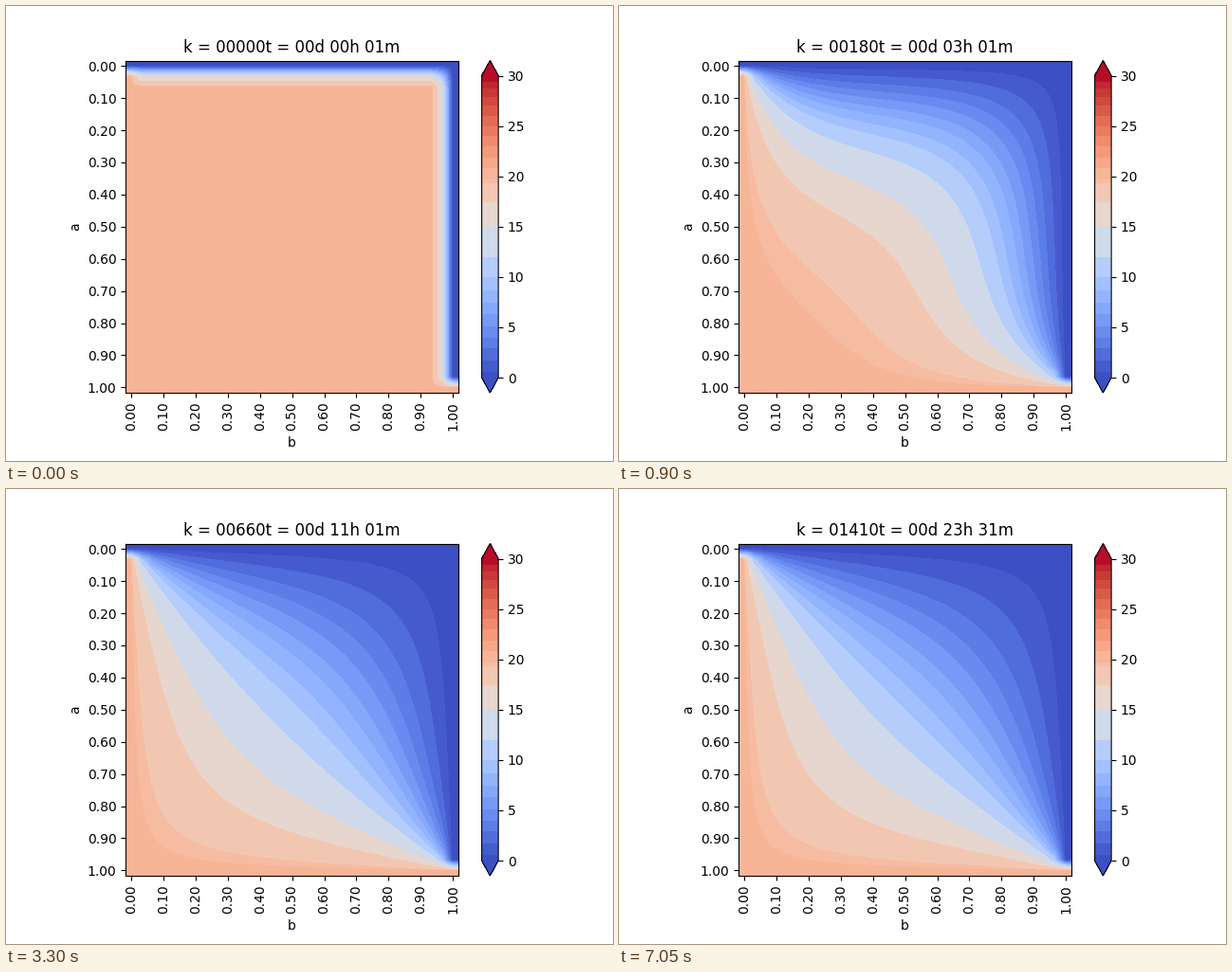
Write a matplotlib script that moves like this. It is 640 px wide and 480 px high and loops after 7200 ms.

```python
import matplotlib.pyplot as plt
import numpy as np
from matplotlib.animation import FuncAnimation
from matplotlib.colors import ListedColormap

N = 31            # nodes per side
HOT, COLD = 20.0, 0.0
VMAX = 30.0
RATE = 0.25       # diffusion number per one-minute step
STRIDE = 30       # steps between drawn frames
FRAMES = 48

# Temperatures at which the colour steps to the next band
EDGES = [0, 0.6, 1.7, 2.9, 4, 5.1, 6.3, 7.4, 8.7, 10, 12, 15, 17.4, 19.3, 19.7,
         20.8, 21.9, 23, 24, 25, 26, 27, 27.9, 28.7, 29.4, VMAX]


def banded_cmap(edges, size=600):
    """Coolwarm, flattened to the middle colour of each band."""
    edges = np.array(edges)
    mids = (edges[:-1] + edges[1:]) / 2
    values = (np.arange(size) + 0.5) / size * VMAX
    band = np.searchsorted(edges, values, side="right") - 1
    return ListedColormap(plt.get_cmap("coolwarm")(mids[band] / VMAX))


def start_field():
    u = np.full((N, N), HOT)
    u[0, :] = COLD
    u[:-1, -1] = COLD
    return u


def step(u):
    new = u.copy()
    c = u[1:-1, 1:-1]
    around = u[:-2, 1:-1] + u[2:, 1:-1] + u[1:-1, :-2] + u[1:-1, 2:]
    new[1:-1, 1:-1] = c + RATE * (around - 4 * c)
    return new


def solve():
    u = step(start_field())
    fields = [u]
    for _ in range(FRAMES - 1):
        for _ in range(STRIDE):
            u = step(u)
        fields.append(u)
    return fields


def caption(k):
    hours, minutes = divmod(k + 1, 60)
    days, hours = divmod(hours, 24)
    return f"k = {k:05d}t = {days:02d}d {hours:02d}h {minutes:02d}m"


fields = solve()

plt.rcParams["font.family"] = "DejaVu Sans"
fig, ax = plt.subplots(figsize=(6.4, 4.8), dpi=100)
fig.subplots_adjust(left=0.125, right=0.9, bottom=0.15, top=0.88)

image = ax.imshow(fields[0], cmap=banded_cmap(EDGES), vmin=0, vmax=VMAX,
                  interpolation="bilinear")
fig.colorbar(image, ax=ax, extend="both", ticks=range(0, 31, 5))

ticks = np.arange(0, N, 3)
labels = [f"{t / (N - 1):.2f}" for t in ticks]
ax.set_xticks(ticks, labels, rotation=90)
ax.set_yticks(ticks, labels)
ax.set_xlabel("b")
ax.set_ylabel("a")
title = ax.set_title(caption(0))


def draw(i):
    image.set_data(fields[i])
    title.set_text(caption(i * STRIDE))
    return image, title


anim = FuncAnimation(fig, draw, frames=FRAMES, interval=150, repeat=True,
                     repeat_delay=0)
plt.show()
```
